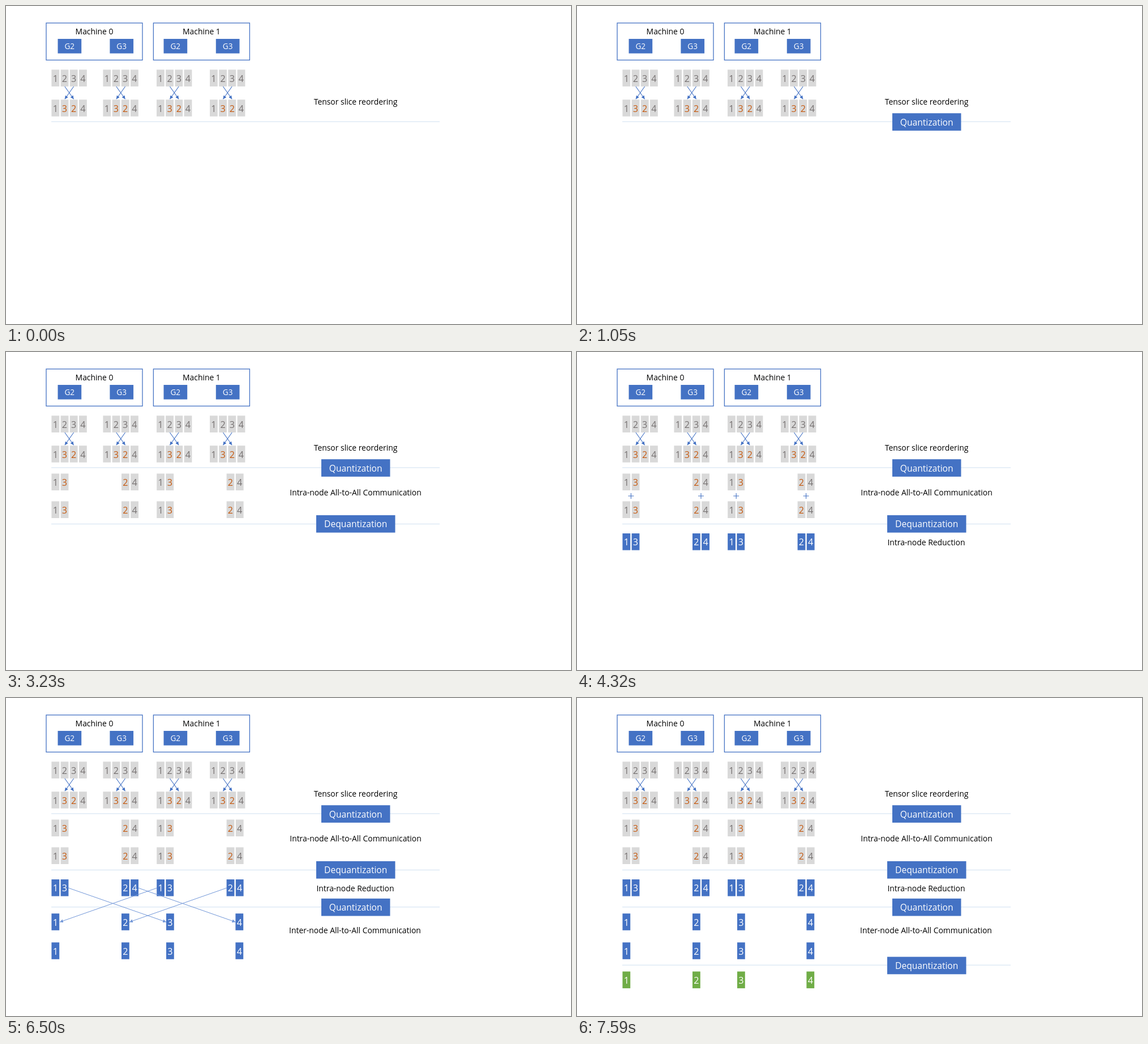
Recreate the animation shown at these times as an HTML page. Size 998 by 561 pixels, loop 8 s.

```html
<!DOCTYPE html>
<html lang="en">
<head>
<meta charset="utf-8">
<title>Tensor slice pipeline</title>
<style>
  html, body { margin: 0; width: 100%; height: 100%; overflow: hidden; background: #fff; }
  svg { display: block; width: 100%; height: 100%; }
  text { font-family: "Open Sans", "Noto Sans", sans-serif; text-anchor: middle; }
  .label { font-size: 13.9px; fill: #000; }
  .gpu { font-size: 13.6px; fill: #fff; }
  .step { font-size: 15.6px; fill: #fff; }
  .digit { font-size: 16.2px; }
  .rule { stroke: #cfe0f1; stroke-width: 1; }
  .blue { fill: #4472c4; }
  .machine { fill: none; stroke: #4472c4; stroke-width: 1.3; }
  .arrow { stroke: #4472c4; stroke-width: 1.1; fill: none; }
  .thin { stroke: #7297d8; stroke-width: 1; }
</style>
</head>
<body>
<svg id="stage" viewBox="0 0 998 561">
  <defs>
    <marker id="head" viewBox="0 0 6 6" refX="6" refY="3" markerWidth="6" markerHeight="6" markerUnits="userSpaceOnUse" orient="auto">
      <path d="M0 0L6 3L0 6z" fill="#4472c4"/>
    </marker>
    <marker id="thinHead" viewBox="0 0 6 6" refX="6" refY="3" markerWidth="6" markerHeight="6" markerUnits="userSpaceOnUse" orient="auto">
      <path d="M0 0L6 3L0 6z" fill="#7297d8"/>
    </marker>
  </defs>
</svg>
<script>
const LOOP = 8000;
const PITCH = 16.2;
const GREY = '#d9d9d9', BLUE = '#4472c4', GREEN = '#70ad47';
const stage = document.getElementById('stage');
const style = document.head.appendChild(document.createElement('style'));

const text = (cls, x, y, s, fill = '') =>
  `<text class="${cls}" x="${x}" y="${y}"${fill && ` fill="${fill}"`}>${s}</text>`;
const box = (x, y, w, h, cls = 'blue') =>
  `<rect class="${cls}" x="${x}" y="${y}" width="${w}" height="${h}"/>`;
const rule = y => `<line class="rule" x1="80" x2="766" y1="${y}" y2="${y}"/>`;
const arrow = (x1, y1, x2, y2, thin) =>
  `<path class="arrow ${thin ? 'thin' : ''}" d="M${x1} ${y1}L${x2} ${y2}" marker-end="url(#${thin ? 'thinHead' : 'head'})"/>`;

// A run of numbered cells; in grey runs the swapped digits may be orange.
function cells(x, y, digits, color = GREY, swapped = false) {
  return [...digits].map((d, i) => {
    const left = x + i * PITCH;
    const ink = color !== GREY ? '#fff' : swapped && '23'.includes(d) ? '#c55a11' : '#767171';
    return `<rect x="${left}" y="${y}" width="13.8" height="29.6" fill="${color}"/>` +
      text('digit', left + 6.9, y + 21.4, d, ink);
  }).join('');
}

const row = (xs, y, groups, color, swapped) =>
  xs.map((x, i) => cells(x, y, groups[i], color, swapped)).join('');

const step = (name, y) => {
  const w = name === 'Quantization' ? 121.5 : 139.5;
  return box(617.7 - w / 2, y, w, 30.7) + text('step', 617.7, y + 21.5, name);
};

const machine = (x, n, gpus) =>
  box(x, 30, 170, 65.4, 'machine') + text('label', x + 85, 50, 'Machine ' + n) +
  gpus.map((g, i) => box(g, 58, 41.7, 25.6) + text('gpu', g + 20.8, 76.4, 'G' + (i + 2))).join('');

// Shows its content from one time to another with hard cuts.
function layer(from, to, content) {
  const name = `show${from}to${to}`;
  const at = t => t / LOOP * 100 + '%';
  const end = to < LOOP ? `${at(to)}, 100% { visibility: hidden }` : '100% { visibility: visible }';
  if (from > 0) {
    style.textContent += `@keyframes ${name} { 0% { visibility: hidden } ${at(from)} { visibility: visible } ${end} }
      #${name} { animation: ${name} ${LOOP}ms step-end infinite }\n`;
  }
  return `<g id="${name}">${content}</g>`;
}

const quads = [80.4, 171.4, 266, 360];
const pairs = [80.4, 204, 266.2, 389.6];
const singles = [80.4, 204, 283, 405.4];
const halves = ['13', '24', '13', '24'];
const ones = ['1', '2', '3', '4'];

const swapArrows = quads.map(x =>
  arrow(x + 23.4, 142, x + 39.2, 164.2) + arrow(x + 39.2, 142, x + 23.4, 164.2)).join('');

const bracket = x => `<path class="arrow" d="M${x} 199.5h29.8"/>`;
const exchange = [113, 171.6, 298.4, 360].map(bracket).join('') +
  arrow(129, 199.5, 204, 278) + arrow(186, 199.5, 110.5, 278) +
  arrow(315, 199.5, 389.6, 278) + arrow(374.5, 199.5, 296.5, 278);

const pluses = pairs.map(x =>
  `<path class="arrow" d="M${x + 10} 254h10m-5 -5v10"/>`).join('');

const crossNode = [[110, 283], [267, 95], [233.5, 405.4], [390, 218]]
  .map(([a, b]) => arrow(a, 335, b, 395.2, true)).join('');

stage.insertAdjacentHTML('beforeend', [
  layer(0, LOOP,
    machine(71, 0, [91.5, 183.4]) + machine(260.4, 1, [278.5, 370.8]) +
    row(quads, 112.3, Array(4).fill('1234')) +
    row(quads, 165.2, Array(4).fill('1324'), GREY, true) +
    swapArrows + rule(204) + text('label', 617.5, 173.7, 'Tensor slice reordering')),
  layer(1050, LOOP, step('Quantization', 189.2)),
  layer(2140, LOOP,
    row(pairs, 214.5, halves, GREY, true) + row(pairs, 263.4, halves, GREY, true) +
    text('label', 617.5, 253, 'Intra-node All-to-All Communication')),
  layer(2140, 3230, exchange),
  layer(3230, LOOP, rule(303.4) + step('Dequantization', 287.9)),
  layer(4320, LOOP,
    row(pairs, 320, halves, BLUE) + text('label', 617, 341.3, 'Intra-node Reduction')),
  layer(4320, 5410, pluses),
  layer(5410, LOOP, rule(368.8) + step('Quantization', 353.8)),
  layer(6500, LOOP,
    row(singles, 380.2, ones, BLUE) + row(singles, 431.2, ones, BLUE) +
    text('label', 616.5, 414.5, 'Inter-node All-to-All Communication')),
  layer(6500, 7590, crossNode),
  layer(7590, LOOP,
    rule(471.2) + step('Dequantization', 456.6) + row(singles, 482.5, ones, GREEN))
].join(''));
</script>
</body>
</html>
```
